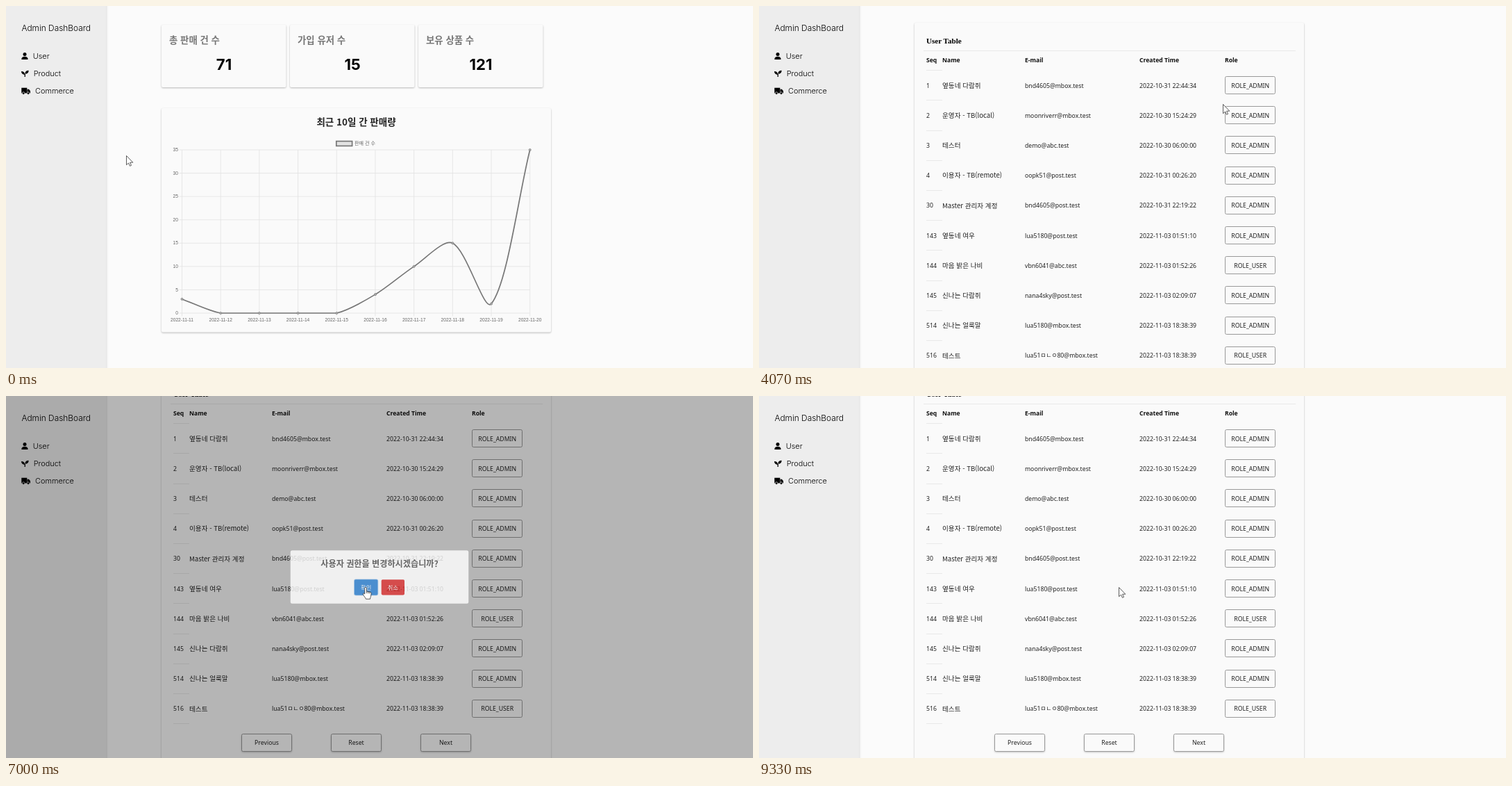
Write an HTML page that moves like this. It is 1076 px wide and 521 px high and loops after 9390 ms.

```html
<!DOCTYPE html>
<html lang="ko">
<head>
<meta charset="utf-8">
<title>Admin DashBoard</title>
<style>
  html, body { margin: 0; width: 100%; height: 100%; overflow: hidden; background: #fbfbfb; }
  svg { display: block; width: 1076px; height: 521px; }
  .side { font: 300 10.9px Inter, sans-serif; }
  .card { fill: #fafafa; filter: drop-shadow(0 1.9px 1.1px #0004); }
  .cardTitle { font: 700 13.4px 'Noto Sans CJK KR', 'Noto Sans CJK', sans-serif; fill: #777; }
  .count { font: 700 22px Inter, sans-serif; text-anchor: middle; }
  .chartTitle { font: 700 13.5px 'Noto Sans CJK KR', 'Noto Sans CJK', sans-serif; fill: #222; text-anchor: middle; }
  .tick { font: 6.65px 'Liberation Sans', 'Noto Sans CJK KR', sans-serif; fill: #666; }
  .grid { stroke: #e2e2e2; stroke-width: .8; }
  .curve { fill: none; stroke: #777; stroke-width: 1.7; }
  .tableTitle { font: 700 11.1px 'Liberation Serif', serif; }
  .cell { font: 8.7px 'Noto Sans', 'Noto Sans CJK KR', sans-serif; fill: #222; }
  .name { font: 350 9.6px 'Noto Sans CJK KR', 'Noto Sans CJK', sans-serif; fill: #222; }
  .head { font: 700 8.6px 'Noto Sans', sans-serif; fill: #111; }
  .rule { stroke: #e9e9e9; }
  .button { fill: #fafafa; stroke: #999; }
  .button.hover { fill: #f7f7f7; }
  .raised { filter: drop-shadow(0 1px .8px #0003); }
  .mid { text-anchor: middle; }
  .ask { font: 700 13.5px 'Noto Sans CJK KR', 'Noto Sans CJK', sans-serif; fill: #545454; text-anchor: middle; }
  .answer { font: 9.2px 'Noto Sans CJK KR', 'Noto Sans CJK', sans-serif; fill: #fff; text-anchor: middle; }
  .cursor { fill: #fff; stroke: #333; stroke-width: .8; stroke-linejoin: round; }
</style>
</head>
<body>
<svg id="stage" viewBox="0 0 1076 521">
  <g id="dashboard"></g>
  <g id="users"></g>
  <g class="side">
    <rect x="-5" y="-9" width="149.5" height="540" fill="#ededed" style="filter:drop-shadow(0 0 1.5px #0003)"/>
    <text x="22.5" y="36" font-size="11.9">Admin DashBoard</text>
    <text x="38.7" y="76">User</text>
    <text x="39.7" y="101">Product</text>
    <text x="42" y="126">Commerce</text>
    <circle cx="27" cy="69.4" r="2.5"/>
    <path d="M22.3 77c0-3 1.8-4.3 4.7-4.3s4.6 1.3 4.6 4.3z"/>
    <path d="M32.6 92.8c0 3.6-2 5-5.2 5 0-3.2 2-5 5.2-5zM22 94c3.2 0 5.2 1.6 5.2 4.9-3.2 0-5.2-1.8-5.2-4.9zM26.6 98h1.3v4h-1.3z"/>
    <path d="M22.3 117.8h8v7.6h-8zM30.7 119.8h2.2l2.1 2.4v3.2h-4.3z"/>
    <g stroke="#ededed" stroke-width=".7"><circle cx="25.2" cy="125.6" r="1.8"/><circle cx="32" cy="125.6" r="1.8"/></g>
  </g>
  <rect id="overlay" width="1076" height="521"/>
  <g id="modal">
    <rect x="-142.5" y="-42.6" width="285" height="85.2" rx="2.8" fill="#fff"/>
    <text class="ask" y="-16">사용자 권한을 변경하시겠습니까?</text>
    <rect x="-41" y="3.2" width="39" height="26.6" rx="3" fill="#97c2ea"/>
    <rect x="-40" y="4.2" width="37" height="24.6" rx="2" fill="#3085d6"/>
    <rect x="3" y="4.2" width="37" height="24.6" rx="2" fill="#d33"/>
    <text class="answer" x="-21.5" y="20">확인</text>
    <text class="answer" x="21.5" y="20">취소</text>
  </g>
  <path id="arrow" class="cursor" d="M.5.5V13.7L3.5 11 5.5 15.3 7.5 14.4 5.6 10.2H9.8Z"/>
  <path id="hand" class="cursor" d="M-1.3 1.5C-1.3-.1 1.3-.1 1.3 1.5V6L6 7C7.7 7.4 8.3 8.2 8.1 9.6L7.5 13.2C7.2 14.4 6.6 15.2 6.5 17.2H.4C0 15.4-2.6 13-3.6 10.6-4.2 9-2.8 8.4-1.3 10ZM1.3 6V9M3.6 6.6V9.2M5.8 7V9.5"/>
</svg>
<script>
const $ = id => document.getElementById(id);
const dashboard = $('dashboard'), users = $('users');

function add(parent, tag, attrs, content) {
  const node = document.createElementNS('http://www.w3.org/2000/svg', tag);
  for (const key in attrs) node.setAttribute(key, attrs[key]);
  if (content !== undefined) node.textContent = content;
  parent.append(node);
  return node;
}
const text = (parent, cls, x, y, content) => add(parent, 'text', { class: cls, x, y }, content);
const line = (parent, cls, x1, y1, x2, y2) => add(parent, 'line', { class: cls, x1, y1, x2, y2 });
const card = (parent, x, y, width, height) => add(parent, 'rect', { class: 'card', x, y, width, height, rx: 2 });
const button = (parent, x, y, cls = '') =>
  add(parent, 'rect', { class: 'button ' + cls, x: x + .5, y: y + .5, width: 72, height: 25, rx: 2 });

// Summary cards
[['총 판매 건 수', 71], ['가입 유저 수', 15], ['보유 상품 수', 121]].forEach(([label, count], i) => {
  const x = 224 + 185 * i;
  card(dashboard, x, 27, 179.5, 90);
  text(dashboard, 'cardTitle', x + 11, 54, label);
  text(dashboard, 'count', x + 90, 91.5, count);
});

// Sales chart
const sales = [3, 0, 0, 0, 0, 4, 10, 15, 2, 35];
const left = 253.5, bottom = 442, top35 = 207, right = 754.7;
const points = sales.map((v, i) => [left + (right - left) * i / 9, bottom - (bottom - top35) * v / 35]);

function smoothPath(pts, tension) {
  const clamp = y => Math.min(bottom, Math.max(top35, y));
  const controls = pts.map((p, i) => {
    const a = pts[i - 1] || p, b = pts[i + 1] || p;
    const da = Math.hypot(p[0] - a[0], p[1] - a[1]), db = Math.hypot(b[0] - p[0], b[1] - p[1]);
    const at = k => [p[0] + k * (b[0] - a[0]), clamp(p[1] + k * (b[1] - a[1]))];
    return [at(-tension * da / (da + db)), at(tension * db / (da + db))];
  });
  return 'M' + pts[0] + pts.slice(1).map((p, i) => `C${controls[i][1]} ${controls[i + 1][0]} ${p}`).join('');
}

card(dashboard, 224, 147, 561, 322.5);
text(dashboard, 'chartTitle', 504.5, 171.5, '최근 10일 간 판매량');
add(dashboard, 'rect', { x: 475.8, y: 194.6, width: 22.8, height: 6.8, fill: '#e2e2e2', stroke: '#777', 'stroke-width': 1.7 });
text(dashboard, 'tick', 502, 200, '판매 건 수').style.fontSize = '7.1px';
points.forEach(([x], i) => {
  line(dashboard, 'grid', x, top35, x, bottom + 4.4);
  text(dashboard, 'tick mid', x, 454.2, '2022-11-' + (11 + i));
});
for (let v = 0; v <= 35; v += 5) {
  const y = bottom - (bottom - top35) * v / 35;
  line(dashboard, 'grid', left - 4.4, y, right, y);
  text(dashboard, 'tick', left - 5.5, y + 2.2, v).style.textAnchor = 'end';
}
add(dashboard, 'path', { class: 'curve', d: smoothPath(points, .3) });
points.forEach(([cx, cy]) => add(dashboard, 'circle', { cx, cy, r: 1.6, fill: '#aaa', stroke: '#777', 'stroke-width': .6 }));

// User table
const accounts = [
  [1, '옆동네 다람쥐', 'bnd4605@mbox.test', '10-31 22:44:34'],
  [2, '운영자 - TB(local)', 'moonriverr@mbox.test', '10-30 15:24:29'],
  [3, '테스터', 'demo@abc.test', '10-30 06:00:00'],
  [4, '이용자 - TB(remote)', 'oopk51@post.test', '10-31 00:26:20'],
  [30, 'Master 관리자 계정', 'bnd4605@post.test', '10-31 22:19:22'],
  [143, '옆동네 여우', 'lua5180@post.test', '11-03 01:51:10'],
  [144, '마음 밝은 나비', 'vbn6041@abc.test', '11-03 01:52:26', 'USER'],
  [145, '신나는 다람쥐', 'nana4sky@post.test', '11-03 02:09:07'],
  [514, '신나는 얼룩말', 'lua5180@mbox.test', '11-03 18:38:39'],
  [516, '테스트', 'lua51ㅁㄴㅇ80@mbox.test', '11-03 18:38:39', 'USER']
];
const columns = [241, 264, 383, 548, 671];
const rowY = i => 117.3 + 43.2 * i;

card(users, 224, 27, 561, 680);
text(users, 'tableTitle', 241, 57, 'User Table');
line(users, 'rule', 237, 67.5, 773, 67.5);
['Seq', 'Name', 'E-mail', 'Created Time', 'Role'].forEach((h, i) => text(users, 'head', columns[i], 83.5, h));
line(users, 'rule', 241, 95.5, 264, 95.5);

const rows = add(users, 'g', {});
const roleButtons = accounts.map(([seq, name, mail, time, role = 'ADMIN'], i) => {
  const y = rowY(i), base = y + 3.2;
  text(rows, 'cell', columns[0], base, seq);
  text(rows, 'name', columns[1], base + .3, name);
  text(rows, 'cell', columns[2], base, mail);
  text(rows, 'cell', columns[3], base, '2022-' + time);
  const box = button(rows, columns[4], Math.round(y - 13.3));
  text(rows, 'cell mid', 707.7, base, 'ROLE_' + role);
  line(rows, 'rule', 241, Math.round(y + 21) + .5, 264, Math.round(y + 21) + .5);
  return box;
});
['Previous', 'Reset', 'Next'].forEach((label, i) => {
  button(users, 339 + 129 * i, 542, 'raised');
  text(users, 'cell mid', 375.5 + 129 * i, 557.7, label);
});

// Timeline
const LOOP = 9390, STEP = 200 / 3, MAX_SCROLL = 56;
const OPEN = 5772, CLOSE = 6970, RELOAD = 7260;
const stops = [
  [0, 173, 215], [140, 173, 215], [1066, 70, 75], [1133, 75, 79], [1533, 46.5, 67],
  [1670, 46.5, 67], [2066, 40.5, 67], [2540, 40.5, 67], [3330, 703, 118], [3533, 671, 134],
  [3600, 673, 136], [3740, 673, 136], [4066, 668, 141], [4320, 668, 141], [4733, 690, 293],
  [4805, 690, 293], [5066, 709.5, 315], [5880, 709.5, 315], [6533, 518, 275], [LOOP, 518, 275]
];
const progress = (t, start, length) => Math.min(1, Math.max(0, (t - start) / length));
const easeInOut = p => p < .5 ? 2 * p * p : 1 - 2 * (1 - p) ** 2;
const easeOut = p => 1 - (1 - p) ** 2;
const mix = (a, b, p) => a + (b - a) * p;

function cursorAt(t) {
  const i = stops.findIndex(s => s[0] > t);
  const [t0, x0, y0] = stops[i - 1], [t1, x1, y1] = stops[i];
  const p = easeInOut((t - t0) / (t1 - t0));
  return [mix(x0, x1, p), mix(y0, y1, p)];
}

function scrollAt(t) {
  const start = t < RELOAD ? 4017 : 9025;
  return Math.round(MAX_SCROLL * easeInOut(progress(t, start, 285)));
}

function modalScale(t) {
  if (t >= CLOSE) return mix(1, .5, progress(t, CLOSE, 150));
  const ms = t - OPEN;
  if (ms < 135) return mix(.7, 1.05, easeOut(progress(ms, 0, 135)));
  if (ms < 240) return mix(1.05, .95, easeInOut(progress(ms, 135, 105)));
  return mix(.95, 1, easeOut(progress(ms, 240, 60)));
}

const show = (node, on) => node.style.display = on ? '' : 'none';

function draw(t) {
  const onUsers = t >= 2260, scroll = scrollAt(t);
  const [x, y] = cursorAt(t);
  show(dashboard, !onUsers);
  show(users, onUsers);
  show(rows, t >= 2330 && !(t >= RELOAD && t < 7330));
  users.setAttribute('transform', `translate(0 ${-scroll})`);

  const modalOpen = t >= OPEN && t < CLOSE + 150;
  show($('modal'), modalOpen);
  $('modal').setAttribute('transform', `translate(538 260.5) scale(${modalScale(t)})`);
  $('modal').style.opacity = 1 - progress(t, CLOSE, 150);
  $('overlay').style.opacity = .4 * (easeOut(progress(t, OPEN, 95)) - progress(t, CLOSE, 100));

  let overButton = false;
  roleButtons.forEach((box, i) => {
    const over = onUsers && t < 5900 && x > 671 && x < 744 && Math.abs(y + scroll - rowY(i)) < 13;
    box.classList.toggle('hover', over);
    overButton ||= over;
  });
  const overLink = x > 20 && x < 66 && y > 64 && y < 78;
  const overConfirm = t > OPEN && t < RELOAD && x > 498 && x < 535 && y > 265 && y < 290;
  const pointing = overButton || overLink || overConfirm;
  show($('hand'), pointing);
  show($('arrow'), !pointing);
  $(pointing ? 'hand' : 'arrow').setAttribute('transform', `translate(${x} ${y})`);
}

const started = performance.now();
function tick() {
  const t = (performance.now() - started) % LOOP;
  draw(Math.floor((t + 4) / STEP) * STEP);
  requestAnimationFrame(tick);
}
tick();
</script>
</body>
</html>
```
